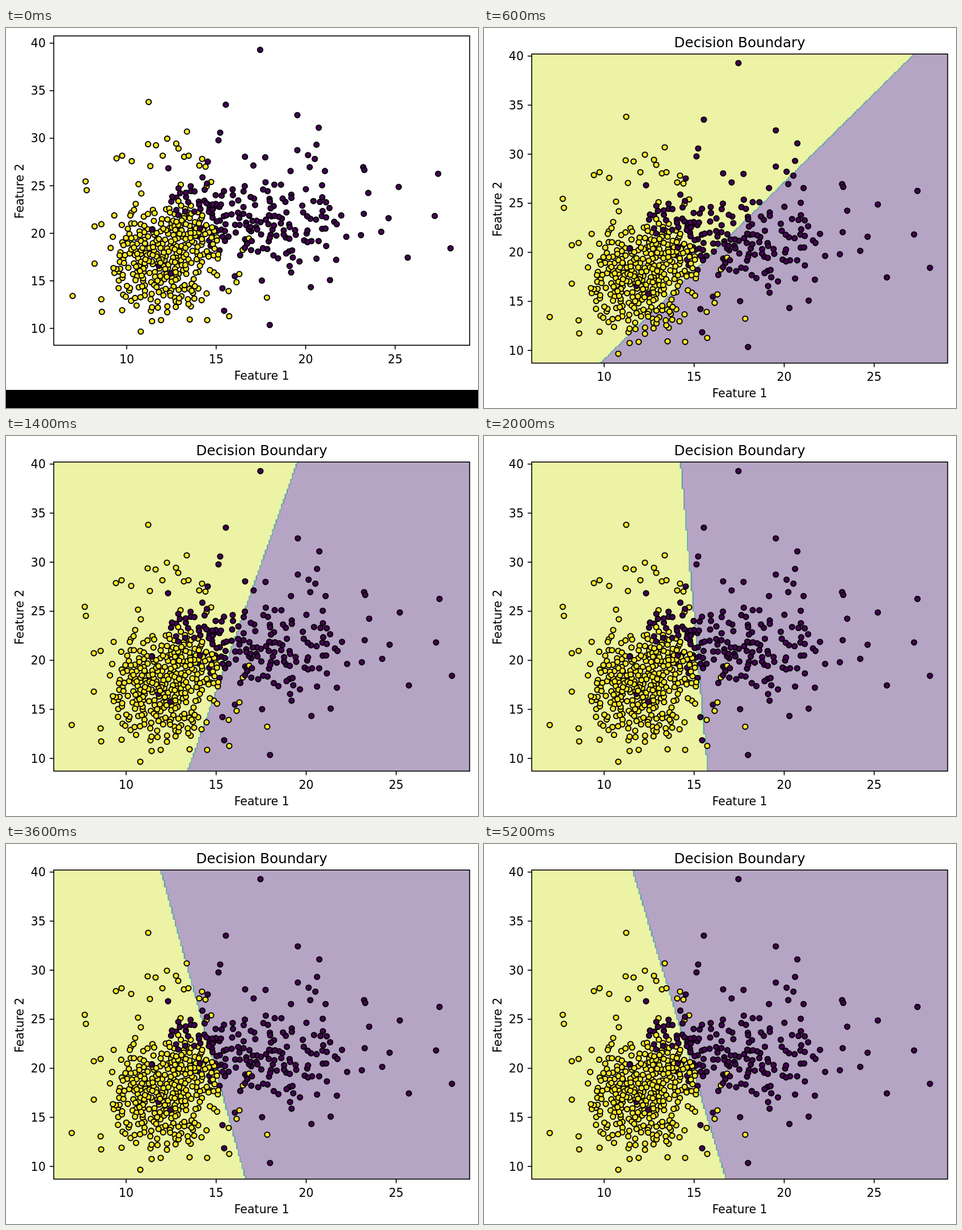
These frames come from a looping animation (833x672 px, 5.4 s). An HTML page with a canvas:

```html
<!DOCTYPE html>
<html lang="en">
<head>
<meta charset="utf-8">
<title>Decision Boundary</title>
<style>
  html, body { margin: 0; width: 833px; height: 672px; overflow: hidden; background: #fff; }
  canvas, svg { position: absolute; left: 0; top: 0; }
  text { font: 20.55px "DejaVu Sans", Verdana, sans-serif; text-anchor: middle; }
  .title { font-size: 24.66px; }
  .tick { text-anchor: end; }
  .axis { fill: none; stroke: #000; stroke-width: 1.64; }
  circle { stroke: #000; stroke-width: 2.05; }
</style>
</head>
<body>
<canvas id="region" width="833" height="672"></canvas>
<svg id="plot" width="833" height="672" viewBox="0 0 833 672"></svg>
<script>
const STEP = 200, LOOP = 5400;
const YELLOW = '#fde725', PURPLE = '#440154';
const LEFT = 84.3, RIGHT = 818.3;

// Pixel box and data limits of the two plots
const scatterView = { top: 14, bottom: 561, x: [5.925, 29.166], y: [8.2315, 40.7585] };
const boundaryView = { top: 46, bottom: 592.6, x: [5.981, 29.081], y: [8.71, 40.21], title: 'Decision Boundary' };

// Outlying samples, as pixels of the boundary plot; the dense middle is seeded below
const yellowOutliers = [
  251,157, 250,234, 264,236, 284,224, 300,233, 304,242, 319,211, 322,255, 314,257,
  346,261, 341,273, 352,275, 194,260, 204,255, 221,265, 254,274, 276,255, 139,302,
  141,318, 233,307, 238,324, 228,343, 116,511, 155,384, 167,380, 155,452, 168,540,
  167,517, 237,576, 257,557, 273,555, 324,554, 355,555, 394,548, 461,514, 407,486,
  412,471, 418,427, 429,406, 393,502, 362,303, 308,308, 354,311, 190,364, 204,537
];
const purpleOutliers = [
  449,62, 388,162, 515,181, 553,204, 378,213, 375,227, 549,235, 515,245, 422,257,
  458,258, 437,273, 356,266, 286,278, 534,254, 546,261, 564,283, 632,276, 634,281,
  765,288, 695,312, 641,323, 759,365, 787,424, 711,441, 677,369, 664,394, 633,361,
  628,400, 602,403, 593,364, 584,445, 573,482, 539,495, 466,564, 385,538, 382,497,
  452,483, 504,468, 585,380, 565,388, 559,309, 566,340, 404,475, 486,308, 503,283,
  537,276, 549,443
];

// Boundary keys: time, x at the top edge, x at the bottom edge
const keys = [
  [200, 892, 142], [1000, 627, 269], [1200, 570, 296], [2000, 347, 395], [2200, 322, 405],
  [2800, 271, 423], [3200, 263, 427], [3600, 273, 423], [4800, 263, 427], [5200, 262, 427]
];

// Filled contour bands from class 0 to class 1; thin inner bands overlap, so they look denser
const bands = [
  [72, 27, 109], [63, 72, 137], [45, 112, 142], [33, 145, 140],
  [41, 175, 127], [99, 203, 95], [207, 225, 28]
].map((rgb, i, all) => {
  const alpha = i === 0 || i === all.length - 1 ? 0.4 : 0.68;
  return rgb.map(c => Math.round(255 + (c - 255) * alpha));
});

const svg = document.getElementById('plot');
const ctx = document.getElementById('region').getContext('2d');
const lerp = (a, b, t) => a + (b - a) * t;

function seeded(seed) {
  return () => {
    seed = (seed + 0x6d2b79f5) | 0;
    let t = Math.imul(seed ^ (seed >>> 15), 1 | seed);
    t = (t + Math.imul(t ^ (t >>> 7), 61 | t)) ^ t;
    return ((t ^ (t >>> 14)) >>> 0) / 4294967296;
  };
}

function makeSamples() {
  const rand = seeded(41);
  const gauss = () => Math.sqrt(-2 * Math.log(1 - rand())) * Math.cos(2 * Math.PI * rand());
  const samples = [];
  const add = (x, y, fill) => samples.push({ x, y, fill, order: rand() });

  function addList(list, fill) {
    for (let i = 0; i < list.length; i += 2) add(list[i], list[i + 1], fill);
  }
  // Normal cloud cut off by an ellipse of radii rx, ry
  function addCloud(count, cx, cy, sx, sy, rx, ry, fill) {
    while (count > 0) {
      const dx = gauss() * sx, dy = gauss() * sy;
      if ((dx / rx) ** 2 + (dy / ry) ** 2 > 1) continue;
      const x = cx + dx, y = cy + dy;
      if (samples.some(p => Math.hypot(p.x - x, p.y - y) < 4.5)) continue;
      add(x, y, fill);
      count--;
    }
  }
  addList(yellowOutliers, YELLOW);
  addList(purpleOutliers, PURPLE);
  addCloud(312, 281, 440, 54, 54, 102, 105, YELLOW);
  addCloud(42, 343, 355, 34, 32, 62, 65, PURPLE);
  addCloud(119, 462, 377, 70, 43, 122, 85, PURPLE);
  add(245, 416, PURPLE);
  add(269, 456, PURPLE);
  add(257, 390, PURPLE);
  add(290, 470, PURPLE);
  return samples.sort((a, b) => a.order - b.order);
}

function el(parent, tag, attrs, text) {
  const node = document.createElementNS('http://www.w3.org/2000/svg', tag);
  for (const name in attrs) node.setAttribute(name, attrs[name]);
  if (text) node.textContent = text;
  parent.append(node);
  return node;
}

const toX = (view, v) => lerp(LEFT, RIGHT, (v - view.x[0]) / (view.x[1] - view.x[0]));
const toY = (view, v) => lerp(view.bottom, view.top, (v - view.y[0]) / (view.y[1] - view.y[0]));

function drawPlot(view, samples) {
  const g = el(svg, 'g', {});
  const base = boundaryView;
  for (const p of samples) {
    const vx = lerp(base.x[0], base.x[1], (p.x - LEFT) / (RIGHT - LEFT));
    const vy = lerp(base.y[0], base.y[1], (base.bottom - p.y) / (base.bottom - base.top));
    el(g, 'circle', { cx: toX(view, vx).toFixed(2), cy: toY(view, vy).toFixed(2), r: 4.6, fill: p.fill });
  }
  const { top, bottom } = view;
  const midX = (LEFT + RIGHT) / 2, midY = (top + bottom) / 2;
  el(g, 'rect', { class: 'axis', x: LEFT, y: top, width: RIGHT - LEFT, height: bottom - top });
  for (let v = 10; v <= 25; v += 5) {
    const x = toX(view, v);
    el(g, 'path', { class: 'axis', d: `M${x} ${bottom}v7.2` });
    el(g, 'text', { x, y: bottom + 31.5 }, String(v));
  }
  for (let v = 10; v <= 40; v += 5) {
    const y = toY(view, v);
    el(g, 'path', { class: 'axis', d: `M${LEFT} ${y}h-7.2` });
    el(g, 'text', { class: 'tick', x: 70, y: y + 7.5 }, String(v));
  }
  el(g, 'text', { x: midX, y: bottom + 60.7 }, 'Feature 1');
  el(g, 'text', { transform: `translate(30.5 ${midY + 1}) rotate(-90)` }, 'Feature 2');
  if (view.title) el(g, 'text', { class: 'title', x: midX, y: 34 }, view.title);
  return g;
}

function boundaryAt(time) {
  let i = 0;
  while (i < keys.length - 2 && time >= keys[i + 1][0]) i++;
  const [a, b] = [keys[i], keys[i + 1]];
  const t = (time - a[0]) / (b[0] - a[0]);
  return [lerp(a[1], b[1], t), lerp(a[2], b[2], t)];
}

// Classifies a grid with cells of 0.1 units and fills the bands between its vertices
function drawRegion(time) {
  const [topX, bottomX] = boundaryAt(time);
  const { top, bottom } = boundaryView;
  const x0 = Math.floor(LEFT), w = Math.ceil(RIGHT) - x0, h = Math.round(bottom - top);
  const cellW = (RIGHT - LEFT) / 231, cellH = (bottom - top) / 315;
  const edge = row => (lerp(bottomX, topX, row / 315) - LEFT) / cellW;
  const img = ctx.createImageData(w, h);
  let k = 0;
  for (let y = 0; y < h; y++) {
    const gy = (bottom - top - y - 0.5) / cellH;
    const row = Math.floor(gy), fy = gy - row;
    const low = edge(row), high = edge(row + 1);
    const classAt = col => lerp(col < low ? 1 : 0, col < high ? 1 : 0, fy);
    for (let x = 0; x < w; x++) {
      const gx = (x + 0.5 + x0 - LEFT) / cellW;
      const col = Math.floor(gx);
      const value = lerp(classAt(col), classAt(col + 1), gx - col);
      const rgb = bands[Math.min(6, Math.floor(value / 0.15))];
      img.data[k++] = rgb[0];
      img.data[k++] = rgb[1];
      img.data[k++] = rgb[2];
      img.data[k++] = 255;
    }
  }
  ctx.putImageData(img, x0, top);
}

const samples = makeSamples();
const scatter = drawPlot(scatterView, samples);
el(scatter, 'rect', { x: 0, y: 640, width: 833, height: 32 });
const boundary = drawPlot(boundaryView, samples);

let shown = -1;
function show(step) {
  if (step === shown) return;
  shown = step;
  scatter.style.display = step === 0 ? '' : 'none';
  boundary.style.display = step === 0 ? 'none' : '';
  ctx.clearRect(0, 0, 833, 672);
  if (step > 0) drawRegion(step * STEP);
}

const start = performance.now();
function tick() {
  show(Math.floor(((performance.now() - start) % LOOP) / STEP));
  requestAnimationFrame(tick);
}
tick();
</script>
</body>
</html>
```
